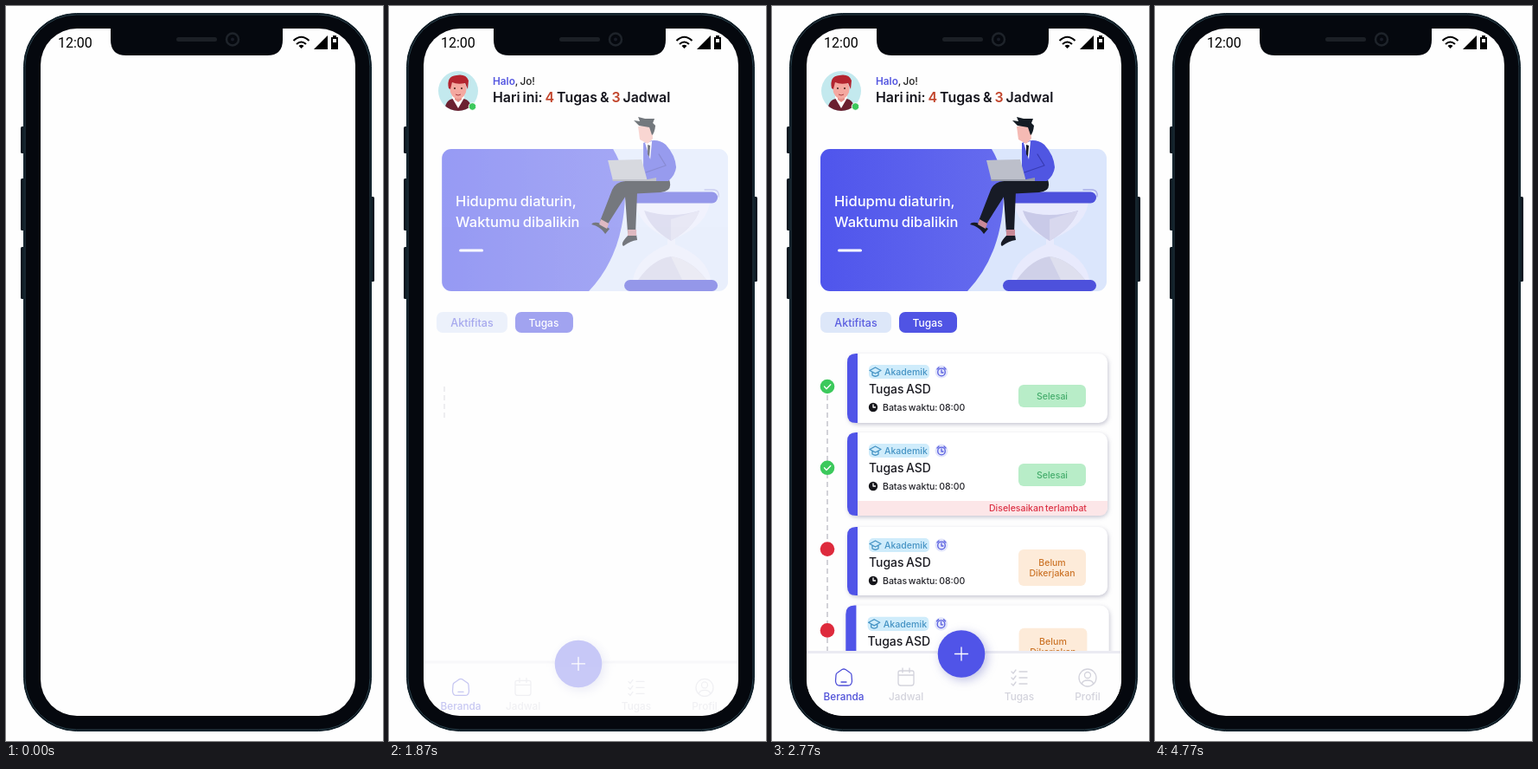
Animation, 436 px wide and 848 px high, one loop 4.8 s. Source, as an HTML page:

```html
<!DOCTYPE html>
<html lang="id">
<head>
<meta charset="utf-8">
<style>
  html, body { margin: 0; width: 100%; height: 100%; overflow: hidden; background: #fefefe; }
  svg { display: block; width: 436px; height: 848px; font: 500 10.5px Inter, sans-serif; word-spacing: -.1em; }
  .shadow { filter: drop-shadow(1px 2px 2.5px rgba(70, 70, 110, .3)); }
  .glow { filter: drop-shadow(3px 3px 6px rgba(70, 75, 180, .35)); }
  .line { fill: none; stroke: currentColor; stroke-width: 1.3; stroke-linecap: round; stroke-linejoin: round; }
  .mid { text-anchor: middle; }
  #nav text { font-size: 11.8px; fill: currentColor; }
</style>
</head>
<body>
<svg viewBox="0 0 436 848">
  <defs>
    <clipPath id="screen"><rect x="40" y="26" width="364" height="793" rx="42"/></clipPath>
    <clipPath id="panel"><rect x="56" y="165" width="331" height="164" rx="11"/></clipPath>
    <clipPath id="face"><circle cx="80" cy="98" r="23"/></clipPath>
    <linearGradient id="blue">
      <stop offset="0" stop-color="#4f55ec"/><stop offset="1" stop-color="#666cee"/>
    </linearGradient>
  </defs>

  <g fill="#0e1a22">
    <rect x="17" y="139" width="5" height="31" rx="1.5"/>
    <rect x="17" y="199" width="5" height="60" rx="1.5"/>
    <rect x="17" y="278" width="5" height="60" rx="1.5"/>
    <rect x="421" y="220" width="5" height="98" rx="1.5"/>
  </g>
  <rect x="20.5" y="8.5" width="402" height="828" rx="61" fill="#05080e" stroke="#12242e"/>
  <rect x="22" y="10" width="399" height="825" rx="59.5" fill="none" stroke="#34525f" stroke-width=".8"/>
  <rect x="40" y="26" width="364" height="793" rx="42" fill="#fefefe"/>

  <g clip-path="url(#screen)">
    <g id="header">
      <g clip-path="url(#face)">
        <rect x="57" y="75" width="46" height="46" fill="#c3e9ee"/>
        <path d="M64 122Q65 108 74 107H86Q95 108 96 122Z" fill="#6b2030"/>
        <path d="M73 106L80 118L87 106V101H73Z" fill="#fff"/>
        <path d="M76 101H84V108L80 111L76 108Z" fill="#e58f88"/>
        <ellipse cx="80" cy="96" rx="9.5" ry="11" fill="#f4a8a0"/>
        <path d="M69 95Q66 81 78 80Q89 78 92 86L91 96L88 89Q79 91 73 88L71 96Z" fill="#b3242f"/>
        <path d="M75 95H77M83 95H85" stroke="#43231c" stroke-width="1.4"/>
        <path d="M77 102Q80 104 83 102" fill="none" stroke="#a83c40"/>
      </g>
      <circle cx="96.500" cy="116" r="4.300" fill="#3cc95c" stroke="#fefefe"/>
      <text x="120" y="91" font-size="11.8" fill="#222"><tspan font-weight="600" fill="#5456e0">Halo</tspan>, Jo!</text>
      <text x="120" y="111" font-size="15.9" font-weight="600" fill="#14141c">Hari ini: <tspan fill="#c2452c">4</tspan> Tugas &amp; <tspan fill="#c2452c">3</tspan> Jadwal</text>
    </g>

    <g id="banner">
      <g clip-path="url(#panel)">
        <rect x="56" y="165" width="331" height="164" fill="#dbe6fc"/>
        <path d="M56 165H254Q268 188 268 218Q266 287 226 329H56Z" fill="url(#blue)"/>
      </g>
      <path d="M280 227H366Q362 253 326 268V275Q363 290 367 316H277Q281 290 317 275V268Q283 253 280 227Z" fill="#e8eafc"/>
      <path d="M290 236Q321 246 354 236Q347 256 321 271Q296 256 290 236Z" fill="#c9cae8"/>
      <path d="M321 246L354 236Q347 256 321 271Z" fill="#d8d8ee"/>
      <path d="M283 316Q300 292 321 289Q344 292 362 316Z" fill="#cfd0e8"/>
      <path d="M321 289Q344 292 362 316H334Z" fill="#dedfee"/>
      <path d="M360 212H371Q377 213 376 220" class="line" color="#a9aee8"/>
      <g fill="#4d51dc">
        <rect x="268" y="214.500" width="107" height="13" rx="6.500"/>
        <rect x="267" y="316" width="108" height="13" rx="6.500"/>
      </g>
      <g fill="#171b26">
        <path d="M318 198Q325 214 309 215L282 213L280 262H271L267 207Q270 200 290 200Z"/>
        <path d="M306 201L268 202Q257 203 253 212L239 248L247 253L270 217L309 215Z"/>
        <path d="M240 251L250 257L245 263Q239 254 229 252Q231 248 240 251Z"/>
        <path d="M271 265L281 264L282 270Q274 271 266 277Q262 274 271 265Z"/>
      </g>
      <path d="M240 246L249 251L247 257L238 252ZM271 258H281V265H271Z" fill="#c98a98"/>
      <path d="M289 158Q304 151 315 160Q326 172 327 186Q326 195 318 202H292L289 191Z" fill="#5056e2"/>
      <path d="M307 171L315 184L292 192" class="line" color="#383cb4"/>
      <path d="M291 158L299 156L297 177Z" fill="#fff"/>
      <path d="M294 160L297 161L296 174L294 171Z" fill="#171b26"/>
      <path d="M283 139L299 137L300 153L294 159L285 154Z" fill="#f5bab4"/>
      <path d="M278 132L285 133L283 128L291 130L302 130L300 135L303 138Q302 147 299 149L296 140L284 138Z" fill="#141c24"/>
      <path d="M248 178L287 177L293 199L293 202H254Z" fill="#bcbfca"/>
      <path d="M253 200H294L304 198V202H254Z" fill="#9599a6"/>
      <g fill="#fff" font-size="16.500">
        <text x="72" y="231">Hidupmu diaturin,</text>
        <text x="72" y="255">Waktumu dibalikin</text>
        <rect x="76" y="280.500" width="28" height="3" rx="1.500"/>
      </g>
    </g>

    <g id="tabs" class="mid">
      <rect x="56" y="353" width="82" height="24" rx="7" fill="#dde7f9"/>
      <text x="97" y="370" font-size="12.500" fill="#5a5de0">Aktifitas</text>
      <rect x="147" y="353" width="67" height="24" rx="7" fill="#5054e4"/>
      <text x="180" y="370" font-size="12" fill="#fff">Tugas</text>
    </g>

    <path id="rail" stroke="#c4c4cc" stroke-width="1.500" stroke-dasharray="6 4"/>
    <g id="cards"></g>

    <g id="nav" class="mid" color="#d3d3dc">
      <rect x="40" y="746" width="364" height="112" fill="#fefefe"/>
      <rect x="40" y="744" width="364" height="3" fill="#ebebf2"/>
      <circle class="glow" cx="219" cy="747.500" r="27.300" fill="#5054e8"/>
      <path d="M211.500 747.500H226.500M219 740V755" class="line" color="#fff"/>
      <g color="#4f50d8">
        <path d="M74 772Q74 770 76 769L81 765.500Q83 764.500 85 765.500L90 769Q92 770 92 772L92.500 779Q92 784 88 784H78Q74 784 73.500 779ZM80 780H86" class="line" stroke-width="1.700"/>
        <text x="83" y="801">Beranda</text>
      </g>
      <path d="M148 767H162Q164 767 164 769V781Q164 784 161 784H149Q146 784 146 781V769Q146 767 148 767ZM146 772H164M151 764V769M159 764V769" class="line"/>
      <text x="155" y="801">Jadwal</text>
      <path d="M277 768L279 770L282 766M277 775L279 777L282 773M277 782L279 784L282 780M286 768H295M286 775H295M286 782H295" class="line"/>
      <text x="286" y="801">Tugas</text>
      <g class="line"><circle cx="365" cy="775" r="10"/><circle cx="365" cy="772" r="3.500"/><path d="M358.500 782Q359 778 365 778Q371 778 371.500 782"/></g>
      <text x="365" y="801">Profil</text>
    </g>
  </g>

  <path d="M121 25H320V39Q320 57 302 57H139Q121 57 121 39Z" fill="#05080e"/>
  <rect x="197" y="36" width="47" height="5" rx="2.500" fill="#1c2026"/>
  <circle cx="262" cy="38.500" r="7" fill="none" stroke="#1e232a" stroke-width="2.500"/>
  <circle cx="262" cy="38.500" r="2" fill="#181c26"/>
  <text x="60" y="48" font-family="Roboto, sans-serif" font-weight="400" font-size="16" fill="#000">12:00</text>
  <path d="M332.500 40Q341.500 31.500 350.500 40M336 44Q341.500 39 347 44" fill="none" stroke="#000" stroke-width="2.100"/>
  <path d="M338.500 46Q341.500 43.500 344.500 46L341.500 49ZM356 50L372 34V50ZM376 36H378V34H382V36H384V50H376Z"/>
  <rect x="378" y="38" width="4" height="4" fill="#fefefe"/>
</svg>

<script>
const $ = id => document.getElementById(id);
const LOOP = 4800, CARD_X = 87, CARD_W = 301;
const cards = [
  { top: 401, height: 80, done: true },
  { top: 492, height: 96, done: true, late: true },
  { top: 601, height: 79 },
  { top: 692, height: 79 },
];

function status(done) {
  return done
    ? `<rect x="198" y="36" width="78" height="26" rx="6" fill="#b8edc8"/>
       <text class="mid" x="237" y="53" fill="#45ad6c">Selesai</text>`
    : `<rect x="198" y="26" width="78" height="42" rx="6" fill="#fdebd9"/>
       <g class="mid" fill="#cc7428"><text x="237" y="45">Belum</text><text x="237" y="57">Dikerjakan</text></g>`;
}

function lateStrip(h) {
  return `<path d="M12 ${h - 17}H${CARD_W}V${h - 10}Q${CARD_W} ${h} ${CARD_W - 10} ${h}H12Z" fill="#fce6e8"/>
    <text x="164" y="${h - 5}" fill="#dc3044">Diselesaikan terlambat</text>`;
}

function cardMarkup({ top, height: h, done, late }, i) {
  const y = 439 + 93.8 * i;
  return `<g>
    <circle cx="64" cy="${y}" r="8.300" fill="${done ? '#3cc95c' : '#de2a3c'}"/>
    ${done ? `<path d="M60.500 ${y}l2.500 2.700l4.800 -5" class="line" stroke-width="1.600" color="#fff"/>` : ''}
    <g class="body">
      <rect class="shadow" width="${CARD_W}" height="${h}" rx="10" fill="#fff"/>
      ${late ? lateStrip(h) : ''}
      <path d="M12 0H10Q0 0 0 10V${h - 10}Q0 ${h} 10 ${h}H12Z" fill="#5054e8"/>
      <rect x="25" y="13" width="70" height="16" rx="5" fill="#cfecfb"/>
      <path d="M26 19.500L32.500 16L39 19.500L32.500 23ZM29 21.500V25Q32.500 27.500 36 25V21.500" class="line" color="#4593c4"/>
      <text x="43" y="25" fill="#4593c4">Akademik</text>
      <circle cx="109" cy="21" r="7.500" fill="#e2e5fb"/>
      <g class="line" color="#5a60e0"><circle cx="109" cy="21.500" r="4.300"/><path d="M109 19V22H111M104 18L106 16M112 16L114 18"/></g>
      <text x="25" y="46" font-size="13.900" fill="#1b1b22">Tugas ASD</text>
      <circle cx="30" cy="62" r="5.200" fill="#15151a"/>
      <path d="M30 59V62H32.500" class="line" color="#fff" stroke-width="1"/>
      <text x="41" y="66" fill="#222228">Batas waktu: 08:00</text>
      ${status(done)}
    </g>
  </g>`;
}

$('cards').innerHTML = cards.map(cardMarkup).join('');
const cardNodes = [...$('cards').children];

const progress = (t, start, length) => Math.min(1, Math.max(0, (t - start) / length));
const remaining = p => (1 - p) ** 3;
const overshoot = p => 1 + 3.3 * (p - 1) ** 3 + 2.3 * (p - 1) ** 2;

function place(node, opacity, transform) {
  node.setAttribute('opacity', opacity);
  if (transform) node.setAttribute('transform', transform);
}

function draw(t) {
  const visible = 1 - progress(t, 3200, 650);
  const header = progress(t, 1150, 550);
  const banner = progress(t, 1220, 1100);
  const tabs = progress(t, 1340, 1000);
  const nav = progress(t, 1560, 1000);
  const rail = progress(t, 1830, 350);

  place($('header'), header * visible);
  place($('banner'), banner * visible, `translate(${75 * remaining(banner)} 0)`);
  place($('tabs'), tabs * visible, `translate(${-10 * remaining(tabs)} 0)`);
  place($('nav'), nav * visible, `translate(0 ${35 * remaining(nav)})`);
  place($('rail'), Math.min(1, rail * 3) * visible);
  $('rail').setAttribute('d', `M64 439V${439 + 310 * rail}`);

  cards.forEach(({ top, height }, i) => {
    const p = progress(t, 1900 + 150 * i, 500);
    const scale = .745 + .255 * overshoot(p);
    place(cardNodes[i], Math.min(1, p * 2) * visible);
    cardNodes[i].querySelector('.body').setAttribute('transform',
      `translate(${CARD_X + CARD_W / 2} ${top + height / 2}) scale(${scale}) translate(${-CARD_W / 2} ${-height / 2})`);
  });
}

function frame() {
  draw(performance.now() % LOOP);
  requestAnimationFrame(frame);
}
frame();
</script>
</body>
</html>
```
